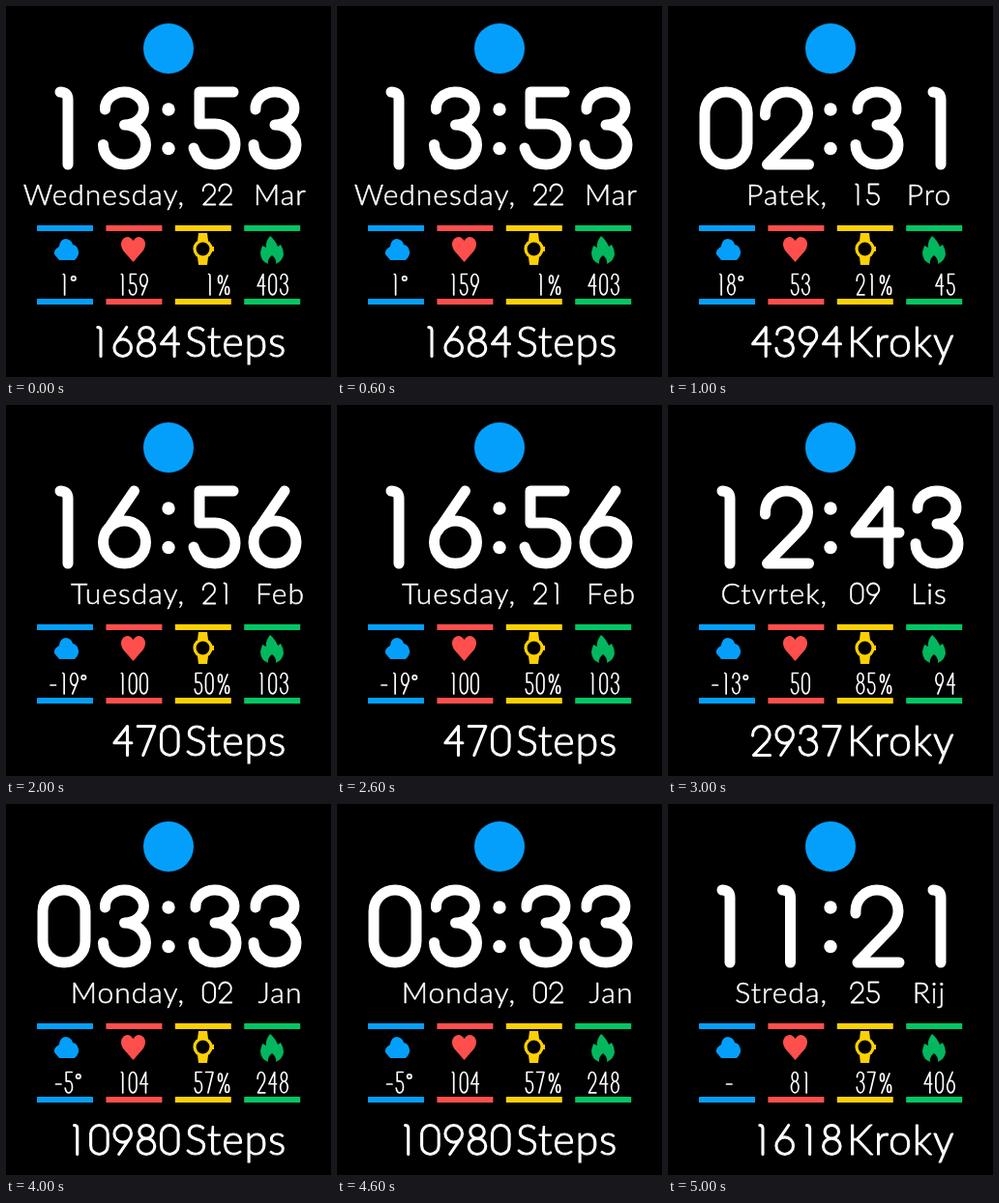
Write an HTML page that moves like this. It is 336 px wide and 384 px high and loops after 6 s.

```html
<!DOCTYPE html>
<html lang="en">
<head>
<meta charset="utf-8">
<title>Watch face</title>
<style>
  html, body { margin: 0; width: 100%; height: 100%; overflow: hidden; background: #000; }
  svg { display: block; width: 336px; height: 384px; }
  text { fill: #fff; stroke: #fff; stroke-linejoin: round; font-family: Lato, sans-serif; font-weight: 300; }
  .date { font-size: 30px; letter-spacing: 1px; stroke-width: .5px; }
  .unit { font-size: 43px; letter-spacing: .8px; stroke-width: 1px; }
  .line { fill: none; stroke: #fff; stroke-linecap: round; stroke-linejoin: round; }
  .line path { vector-effect: non-scaling-stroke; }
</style>
</head>
<body>
<svg id="face" viewBox="0 0 336 384">
  <circle cx="168" cy="44" r="26" fill="#049ffb"/>
  <g fill="#fff"><circle cx="168" cy="107" r="6.7"/><circle cx="168" cy="147.500" r="6.7"/></g>
  <path fill="#049ffb" d="M55 263 L50 257 Q49 252 55 249 Q56 241 62 241 Q68 242 69 247 Q74 248 75 254 Q76 258 71 263Z"/>
  <path fill="#ff4f4c" d="M131.500 265 L121 253 Q117 246 121 241 Q127 236 131.500 243 Q136 236 142 241 Q146 246 142 253Z"/>
  <g fill="#fdd005">
    <path d="M198 243 L199 235 H208 L209 243Z M198 260 L199 268 H208 L209 260Z"/>
    <rect x="212" y="249" width="3" height="5"/>
    <circle cx="203.500" cy="251.500" r="8.500" fill="#000" stroke="#fdd005" stroke-width="3.200"/>
  </g>
  <path fill="#03b75f" d="M271 267 Q263 264 263 255 L265 248 L269 250 Q268 244 273 238 Q278 242 281 249 L284 247 Q287 252 287 257 Q286 264 279 267 Q280 262 275 258 Q270 262 271 267Z"/>
</svg>
<script>
const face = document.getElementById('face');

// Stroked numerals on a 44 x 75 box
const digits = [
  'M0 22a22 22 0 0 1 44 0V53a22 22 0 0 1-44 0Z',
  'M18 0Q26 0 26 8V75',
  'M0 24V22a22 22 0 0 1 44 0Q44 31 37 39L2 75H45',
  'M2 18A20 17 0 1 1 22 34A22 20.5 0 1 1 0 54.5',
  'M34 75V0L0 43H45',
  'M41 0H6V33H22A21 21 0 0 1 22 75Q5 75 0 58',
  'M32 0L4 41M0 53a22 22 0 1 0 44 0a22 22 0 1 0-44 0',
  'M0 0H44L14 75',
  'M4 17a18 17 0 1 0 36 0a18 17 0 1 0-36 0M0 54.5a22 20.5 0 1 0 44 0a22 20.5 0 1 0-44 0',
  'M12 75L40 34M0 22a22 22 0 1 0 44 0a22 22 0 1 0-44 0'
];

const states = [
  { time: '1353', day: 'Wednesday,', date: '22', month: 'Mar', temp: '1°', pulse: '159', power: '1', burn: '403', steps: '1684' },
  { time: '0231', day: 'Patek,', date: '15', month: 'Pro', temp: '18°', pulse: '53', power: '21', burn: '45', steps: '4394', cz: true },
  { time: '1656', day: 'Tuesday,', date: '21', month: 'Feb', temp: '-19°', pulse: '100', power: '50', burn: '103', steps: '470' },
  { time: '1243', day: 'Ctvrtek,', date: '09', month: 'Lis', temp: '-13°', pulse: '50', power: '85', burn: '94', steps: '2937', cz: true },
  { time: '0333', day: 'Monday,', date: '02', month: 'Jan', temp: '-5°', pulse: '104', power: '57', burn: '248', steps: '10980' },
  { time: '1121', day: 'Streda,', date: '25', month: 'Rij', temp: '-', pulse: '81', power: '37', burn: '406', steps: '1618', cz: true }
];

function add(parent, tag, attrs, content) {
  const el = document.createElementNS('http://www.w3.org/2000/svg', tag);
  for (const key in attrs) el.setAttribute(key, attrs[key]);
  if (content) el.textContent = content;
  return parent.appendChild(el);
}

const lines = (parent, width) => add(parent, 'g', { class: 'line', 'stroke-width': width });

function numeral(parent, digit, x, y, sx, sy = sx) {
  add(parent, 'path', { d: digits[digit], transform: `translate(${x} ${y}) scale(${sx} ${sy})` });
}

// Right-aligned number; right is the left edge of its last numeral
function number(parent, value, right, y, pitch, sx, sy) {
  [...value].forEach((d, i) => numeral(parent, d, right - (value.length - 1 - i) * pitch, y, sx, sy));
}

function temperature(parent, value) {
  const advance = c => c === '-' ? 10 : c === '°' ? 7 : 11;
  let x = 64 - [...value].reduce((sum, c) => sum + advance(c), 0) / 2;
  for (const c of value) {
    if (c === '-') add(parent, 'path', { d: `M${x + 1.5} 290h5.5` });
    else if (c === '°') add(parent, 'circle', { cx: x + 3.8, cy: 282, r: 2.2 });
    else numeral(parent, c, x + 1.2, 277.5, .17, .285);
    x += advance(c);
  }
}

function build(s) {
  const g = add(face, 'g', {});
  const clock = lines(g, 11);
  [38, 100.5, 194, 256].forEach((x, i) => numeral(clock, s.time[i], x, 89, 1));

  add(g, 'text', { class: 'date', x: s.cz ? 165 : 185, y: 206, 'text-anchor': 'end' }, s.day);
  number(lines(g, 1.9), s.date, s.cz ? 206 : 220.5, 184.5, 16.8, .28);
  add(g, 'text', { class: 'date', x: s.cz ? 270 : 283.5, y: 205.5, 'text-anchor': 'middle' }, s.month);

  const small = lines(g, 1.7);
  temperature(small, s.temp);
  number(small, s.pulse, 138.7, 277.5, 11.2, .17, .285);
  number(small, s.power, 206.5, 277.5, 11.3, .17, .285);
  number(small, s.burn, s.cz ? 288.7 : 283.7, 277.5, 11.8, .17, .285);

  number(lines(g, 3.1), s.steps, 160.5, 332.5, 24.3, .4);
  add(g, 'text', { class: 'unit', x: 185, y: 363 }, s.cz ? 'Kroky' : 'Steps');
  return g;
}

['#049ffb', '#ff4f4c', '#fdd005', '#03c664'].forEach((fill, i) => {
  for (const y of [227, 303]) add(face, 'rect', { x: 32 + i * 71.4, y, width: 58, height: 6, rx: .6, fill });
});

const percent = lines(face, 1.7);
add(percent, 'path', { d: 'M229 279L221 299' });
for (const [cx, cy] of [[221.5, 283], [228.7, 294.5]]) add(percent, 'ellipse', { cx, cy, rx: 2, ry: 4 });

const views = states.map(build);
const start = performance.now();

function draw() {
  const current = Math.floor((performance.now() - start) / 1000) % views.length;
  views.forEach((view, i) => view.style.display = i === current ? '' : 'none');
  requestAnimationFrame(draw);
}
draw();
</script>
</body>
</html>
```
